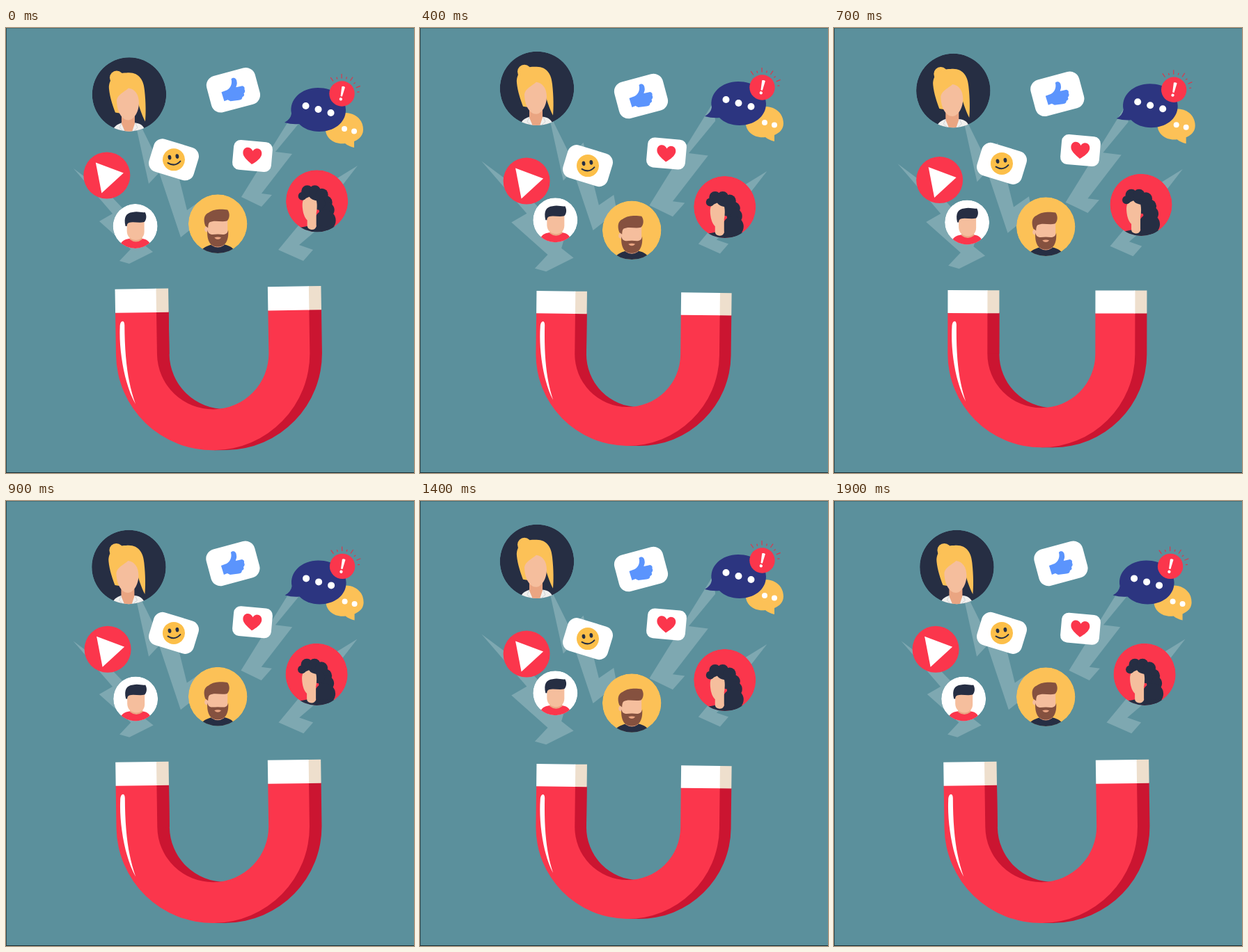
An HTML page for the animation above (2 s loop, 586 by 640 pixels).

```html
<!DOCTYPE html>
<html lang="en">
<head>
<meta charset="utf-8">
<title>Social magnet</title>
<style>
  html, body { margin: 0; width: 100%; height: 100%; overflow: hidden; background: #5b909c; }
  svg { display: block; width: 100%; height: 100%; }
  .navy { fill: #262e43; }
  .red { fill: #fb364c; }
  .dark { fill: #cb1531; }
  .yellow { fill: #fcc157; }
  .skin { fill: #f5be9d; }
  .shade { fill: #eaa582; }
  .brown { fill: #85513f; }
  .white { fill: #fff; }
  .beige { fill: #eedfcd; }
  .bolt { fill: #fff; fill-opacity: .21; }
</style>
</head>
<body>
<svg viewBox="0 0 586 640" xmlns="http://www.w3.org/2000/svg">
  <defs>
    <clipPath id="clipWoman"><circle r="53.2"/></clipPath>
    <clipPath id="clipBoy"><circle r="32"/></clipPath>
    <clipPath id="clipMan"><circle r="42.3"/></clipPath>
    <clipPath id="clipCurly"><circle r="44.6"/></clipPath>
    <path id="arch" d="M163 409V468.5A134.5 134.5 0 0 0 432 468.5V409H375V468.5A77.5 77.5 0 0 1 220 468.5V409Z"/>
  </defs>
  <rect width="586" height="640" fill="#5b909c"/>
  <g fill="none">
    <path d="M0 .5H586" stroke="#44707a"/>
    <path d="M.5 0V640" stroke="#2c4a52"/>
    <path d="M0 639.5H586" stroke="#1c2f35"/>
  </g>

  <g class="bolt">
    <path id="boltLeft" d="M97 202L152 243L172 264L166 282L200 296L196 310L211 322L177 339L163 335L179 318L134 278L153 267Z"/>
    <path id="boltMidLeft" d="M181 115L213 180L220 182L236 165L260 262L283 246L295 310L275 282L251 301L220 208L205 224Z"/>
    <path id="boltMidRight" d="M418 114L338 243L367 257L382 240L367 238L411 181L387 178L420 138Z"/>
    <path id="boltRight" d="M505 198L440 238L420 284L391 319L427 335L441 319L421 312L455 283L474 238Z"/>
  </g>

  <g id="magnet">
    <use href="#arch" x="17" class="dark"/>
    <path class="dark" d="M220 409H237V468.5H220ZM297.5 580H314.5V603H297.5Z"/>
    <use href="#arch" class="red"/>
    <path class="beige" d="M219 377H237V410H219ZM431 377H449V410H431Z"/>
    <path class="white" d="M163 377H220V410H163ZM375 377H432V410H375Z"/>
    <path class="white" d="M169 430C169 420 175.500 419 175.500 427C175 474 179 508 189 537C174 510 167 462 169 430Z"/>
  </g>

  <g id="woman" clip-path="url(#clipWoman)">
    <circle r="53.2" class="navy"/>
    <circle cx="-18" cy="-24" r="10" class="yellow"/>
    <path class="yellow" d="M-29-8C-30-24-18-31-4-31C14-33 21-20 22-6C24 12 24 28 23 39C18 30 13 14 9-2L-8 28L-20 26C-23 18-28 4-29-8Z"/>
    <path fill="#f1f0ee" d="M-24 54C-23 46-17 43-11 41L9 41C17 42 22 46 23 54Z"/>
    <path class="shade" d="M-11 24H8V42L4 54H-6L-11 42Z"/>
    <path class="skin" d="M-18 8C-16 0-8-3-1-9C8-8 14 0 14 12C14 26 6 37-1 37C-11 37-18 24-18 8Z"/>
    <path d="M-11 41L-14 48L-7 54M9 41L12 48L5 54" fill="none" stroke="#cfd3d6"/>
  </g>

  <g id="like">
    <rect x="-36" y="-27" width="72" height="54" rx="14" class="white" transform="rotate(-15)"/>
    <path fill="#5b94fd" d="M-17 3L-9 0C-4-3-1-9-3-16C-1-19 5-18 5-12C6-8 4-6 4-4L13-6Q17-5 16-1Q18 2 15 5Q17 8 13 10Q13 14 8 14.500L-4 16L-8 14L-13 16Z"/>
  </g>

  <g id="chat">
    <path class="yellow" d="M487 122C503 122 513 133 513 146C513 155 507 160 500 163L500 172Q492 170 487 166C471 168 459 158 459 146C459 132 471 122 487 122Z"/>
    <circle cx="486" cy="145" r="4" class="white"/>
    <circle cx="500" cy="148.500" r="4" class="white"/>
    <path fill="#2c3580" d="M448 86C470 86 488 99 488 118C488 137 470 149 450 149C438 149 428 145 421 138Q411 139 400 136Q409 131 410 123C406 103 424 86 448 86Z"/>
    <circle cx="430.500" cy="112" r="5" class="white"/>
    <circle cx="448.500" cy="117" r="5" class="white"/>
    <circle cx="466.500" cy="122" r="5" class="white"/>
    <g transform="translate(482.500 94.500)">
      <circle r="18.200" class="red"/>
      <g id="rays" stroke="#d8384c" stroke-width="1.200"></g>
      <g transform="rotate(12)" class="white">
        <path d="M-2.400-10Q0-11.500 2.400-10L1.200 4H-1.200Z"/>
        <circle cy="8" r="2.200"/>
      </g>
    </g>
  </g>

  <g id="smiley">
    <rect x="-33.500" y="-24.500" width="67" height="49" rx="13" class="white" transform="rotate(17)"/>
    <circle r="16" fill="#fcbf49"/>
    <g transform="rotate(-8)">
      <ellipse cx="-5.500" cy="-4" rx="2.400" ry="3.300" class="navy"/>
      <ellipse cx="5.500" cy="-4" rx="2.400" ry="3.300" class="navy"/>
      <path d="M-9 3.500Q0 11 9 3.500" fill="none" stroke="#262e43" stroke-width="2" stroke-linecap="round"/>
    </g>
  </g>

  <g id="heart">
    <g transform="rotate(5)">
      <rect x="-28" y="-21.500" width="56" height="43" rx="10" class="white"/>
      <path class="red" d="M0 12C-7 7-14 2-14-4C-14-13-4-14 0-7C3-14 13-12 13-4C13 2 6 8 0 12Z"/>
    </g>
  </g>

  <g id="play">
    <circle r="33.500" class="red"/>
    <path class="white" d="M-16-18.500L24-3.500L-7.500 25.500Z"/>
  </g>

  <g id="boy" clip-path="url(#clipBoy)">
    <circle r="32" class="white"/>
    <path class="red" d="M-23 33C-22 21-15 19-9 18H10C18 19 22 23 23 33Z"/>
    <path class="shade" d="M-8 10H10V19Q1 26-8 19Z"/>
    <path class="skin" d="M-12-8H13V8C13 16 7 20 1 20C-6 20-12 15-12 7Z"/>
    <path class="navy" d="M-14 0C-17-13-13-19-4-20C4-22 9-19 14-20C17-15 16-9 13-6C6-4-3-7-9-5Q-12-4-12 0Z"/>
  </g>

  <g id="man" clip-path="url(#clipMan)">
    <circle r="42.300" class="yellow"/>
    <path class="navy" d="M-26 44C-24 35-16 32-9 30H10C18 32 24 35 25 44Z"/>
    <path class="shade" d="M-9 18H9V31Q0 37-9 31Z"/>
    <circle cx="-15" cy="8" r="4" class="skin"/>
    <path class="skin" d="M-14-9H14V16C14 26 6 30 0 30C-8 30-14 24-14 16Z"/>
    <path class="brown" d="M-18 3C-21-6-20-13-13-16C-5-22 7-21 14-20C18-15 17-7 13-4C4-2-5-6-12-2Q-14 0-14 6Z"/>
    <path class="brown" d="M-15 9C-13 18-6 15 0 15C6 15 13 18 15 9C16 26 10 33 0 33C-10 33-16 26-15 9Z"/>
    <path class="shade" d="M-5 20Q0 18 5 20Q0 25-5 20Z"/>
  </g>

  <g id="curly" clip-path="url(#clipCurly)">
    <circle r="44.600" class="red"/>
    <g class="navy">
      <circle cx="-14" cy="-14" r="8.500"/>
      <circle cx="-3" cy="-14" r="8.500"/>
      <circle cx="7" cy="-9" r="9"/>
      <circle cx="12" cy="2" r="10"/>
      <circle cx="14" cy="13" r="11"/>
      <circle cx="12" cy="28" r="15"/>
      <circle cx="3" cy="4" r="9"/>
      <path d="M-28 47V39Q-18 37-12 36H4L28 37V47Z"/>
    </g>
    <path class="skin" d="M-14 18H-1V37Q-3 42-9 41Q-14 40-14 35Z"/>
    <path class="skin" d="M-21 5C-21-4-15-7-8-7C-2-7 0-1 0 7C0 20-4 29-10 29C-17 29-21 17-21 5Z"/>
    <circle cx="-21" cy="-7" r="6" class="navy"/>
    <path class="navy" d="M-20-8H2V0Q-8-1-11-6L-20-2Z"/>
  </g>
</svg>
<script>
  const LOOP = 2000, STEP = 100;
  const el = id => document.getElementById(id);
  const place = (id, value) => el(id).setAttribute('transform', value);
  const swing = phase => (1 - Math.cos(2 * Math.PI * phase)) / 2;

  // start position, travel and lag of everything that sways
  const drifters = {
    woman: [177, 95.5, -9.6, -9.2],
    like: [326.5, 89.3, -9.6, 9.3],
    chat: [0, 0, 9.6, -9.6],
    smiley: [241, 189.3, 0, 9.4],
    play: [144.8, 212, 9.6, 9.2, .04],
    boy: [185.6, 285, 9.3, -9.4],
    curly: [446.7, 248.7, -9.5, 9.4]
  };

  // pivot and added scale
  const bolts = {
    boltLeft: [151, 268, .17],
    boltMidLeft: [216, 160, -.075],
    boltMidRight: [393, 165, .165],
    boltRight: [456, 257, -.145]
  };

  for (let i = 0; i < 8; i++) {
    const ray = document.createElementNS('http://www.w3.org/2000/svg', 'path');
    ray.setAttribute('d', `M22 0H${i % 2 ? 25 : 28.5}`);
    ray.setAttribute('transform', `rotate(${-125 + i * 17})`);
    el('rays').append(ray);
  }

  function draw(t) {
    const u = swing(t + .02);
    for (const [id, [x, y, dx, dy, lag = 0]] of Object.entries(drifters)) {
      const v = swing(t + .02 - lag);
      place(id, `translate(${x + dx * v} ${y + dy * v})`);
    }
    for (const [id, [x, y, grow]] of Object.entries(bolts))
      place(id, `translate(${x} ${y}) scale(${1 + grow * u}) translate(${-x} ${-y})`);
    place('man', `translate(304.2 ${280.9 + 10 * swing((t + .09) / 1.04)})`);
    place('heart', `translate(354 ${179 + 5 * Math.cos(Math.PI * t)})`);
    place('magnet', `translate(306.3 490.3) rotate(${-.9 + 1.65 * u}) scale(${1.035 - .059 * u}) translate(-306 -490)`);
  }

  function tick() {
    const ms = (performance.now() + 4) % LOOP;
    draw(Math.floor(ms / STEP) * STEP / 1000);
    requestAnimationFrame(tick);
  }
  tick();
</script>
</body>
</html>
```
